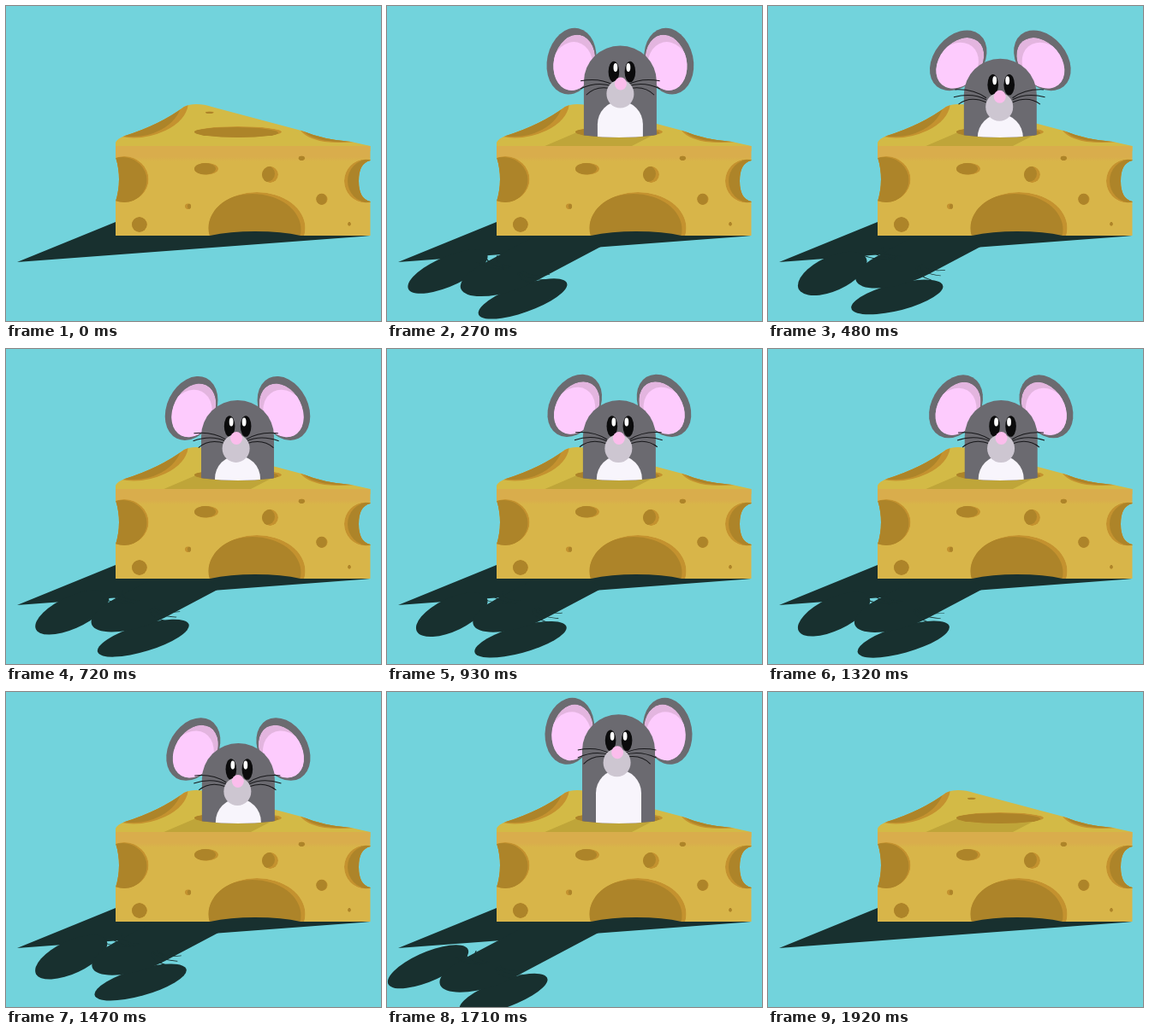
Write an HTML page with a canvas that moves like this. It is 438 by 369 pixels and loops after 1950 ms.

```html
<!DOCTYPE html>
<html lang="en">
<head>
<meta charset="utf-8">
<title>Mouse in the cheese</title>
<style>
html, body { margin: 0; width: 100%; height: 100%; overflow: hidden; background: #72d3dc; }
canvas { display: block; }
</style>
</head>
<body>
<canvas id="stage" width="438" height="369"></canvas>
<script>
const ctx = document.getElementById('stage').getContext('2d');
const { PI, sin, cos, exp, min, max } = Math;
const LOOP = 1950, FRAME = 30;
const DEPTH = 145;               // how far the mouse sinks to be out of sight
const RISE = 30, EXIT = 1480, EXIT_TIME = 430;
const C = {
  sky: '#72d3dc', shade: '#18302f', front: '#d8b549', band: '#d9ad4c', top: '#d3ba46',
  cast: '#bfa539', hole: '#ad8429', lip: '#c4922f', fur: '#6b6a70', earRim: '#6b6b70',
  earDeep: '#e3b5df', ear: '#fdcbfd', muzzle: '#cdc6d1', nose: '#fbbdec', belly: '#f8f5fc'
};

const sinceRise = t => max(0, t - RISE) / 1000;

// pops up like a damped spring
function spring(t) {
  const s = sinceRise(t);
  return DEPTH * exp(-9 * s) * cos(5 * PI * s);
}

// leaves with a wind-up before the drop
function exit(t) {
  const u = min(1, max(0, (t - EXIT) / EXIT_TIME));
  return DEPTH * u * u * (3.9 * u - 2.9);
}

function poseAt(t) {
  const s = sinceRise(t);
  const swing = -46 * exp(-3.5 * s) * sin(4 * PI * (s - 0.08));
  const drag = 1.25 * (exit(t - 30) - exit(t - 120));
  const x = 271.5 - cos(2 * PI * (t - 700) / 1000);
  return { x, face: x - 272.4, drop: spring(t) + exit(t), ear: min(60, 30 + swing + drag) };
}

function ellipsePath(x, y, rx, ry) {
  const p = new Path2D();
  p.ellipse(x, y, rx, ry, 0, 0, PI * 2);
  return p;
}

function oval(x, y, rx, ry, fill) {
  ctx.fillStyle = fill;
  ctx.fill(ellipsePath(x, y, rx, ry));
}

function shape(d, fill) {
  ctx.fillStyle = fill;
  ctx.fill(new Path2D(d));
}

function within(path, draw) {
  ctx.save();
  ctx.clip(path);
  draw();
  ctx.restore();
}

// a hole whose lit rim shows beside its dark inside
function hole(x, y, rx, ry, dx, dy = 0) {
  within(ellipsePath(x, y, rx, ry), () => {
    oval(x, y, rx, ry, C.lip);
    oval(x + dx, y + dy, rx, ry, C.hole);
  });
}

const wedge = new Path2D('M128 164V160Q130 155 139 152Q180 139 208 118Q214 115 222 115Q232 115 240 118' +
  'L345 146Q372 157 403 159L425.5 164V181Q412 184 412 205Q412 226 425.5 229V269H128V229Q136 203 128 177Z');

function drawCheese(cast) {
  within(wedge, () => {
    ctx.fillStyle = C.top;
    ctx.fillRect(120, 110, 310, 60);
    if (cast) shape('M182 165L224 147L313 150L284 165Z', C.cast);
    const face = ctx.createLinearGradient(0, 177, 0, 182);
    face.addColorStop(0, C.band);
    face.addColorStop(1, C.front);
    ctx.fillStyle = face;
    ctx.fillRect(120, 164, 310, 106);

    shape('M134 153Q160 158 186 146Q211 134 213 114L200 118Z', C.lip);
    shape('M136 152Q160 156 181 145Q201 134 206 114L200 118Z', C.hole);
    shape('M343 144Q349 155 372 159Q390 161 408 159Z', C.lip);
    shape('M346 145Q354 155 376 158Q390 160 405 158Z', C.hole);
    hole(238, 124.8, 5, 1.3, -1);
    hole(271, 147.5, 51, 6.5, -4, 1);

    hole(138, 203, 28.5, 27, -2, 1);
    hole(420, 205, 25, 25.5, 4);
    hole(234, 190.7, 14, 7, -3);
    hole(308.5, 197.5, 9.5, 9.7, -4, -1);
    hole(345.5, 178.3, 3.8, 2.8, -0.5);
    hole(369, 226.3, 6.7, 6.7, -1);
    hole(212.5, 234.7, 3.6, 3.4, 3);
    hole(156, 256, 9, 9, -0.5);
    hole(401, 255.2, 1.9, 2.5, 0);
    hole(293, 260, 56.5, 42, -5, 2);
    shape('M236 269.5Q260 264 291 264Q324 264 346 269.5Z', C.shade);
  });
}

function bothSides(draw) {
  for (const side of [-1, 1]) {
    ctx.save();
    ctx.scale(side, 1);
    draw();
    ctx.restore();
  }
}

function drawEar(angle, ink) {
  ctx.translate(20, 26);
  ctx.rotate(-angle * PI / 180);
  // at zero turn the ear stands upright beside its joint
  ctx.translate(37.7, 0);
  oval(0, 0, 28.5, 39.3, ink || C.earRim);
  if (ink) return;
  within(ellipsePath(-3.5, 1, 24, 33), () => {
    oval(-3.5, 1, 24, 33, C.earDeep);
    oval(-2, 10, 25, 33, C.ear);
  });
}

function drawMouse(p, ink) {
  const w = ink ? 38.5 : 42.5;   // the shadow is a little slimmer
  ctx.save();
  ctx.translate(p.x, 60 + p.drop);
  bothSides(() => drawEar(p.ear, ink));
  shape(`M${-w} 150V42A${w} 42 0 0 1 ${w} 42V150Z`, ink || C.fur);
  if (!ink) shape('M-26.5 150V92A26.5 27 0 0 1 26.5 92V150Z', C.belly);

  ctx.translate(p.face, 0);
  ctx.strokeStyle = ink || '#17171a';
  ctx.lineWidth = 1;
  bothSides(() => {
    ctx.translate(13, 0);
    ctx.rotate((30 - p.ear) * 0.3 * PI / 180);
    ctx.stroke(new Path2D('M0 46Q15 36 37 38M0 48Q17 40 38 47M0 51Q19 44 32 55'));
  });
  if (!ink) {
    for (const side of [-1, 1]) {
      const x = 2 + side * 9.5;
      oval(x, 30.5, 6.3, 12.3, '#0b0b0c');
      oval(x - side * 2, 25.5, 2.4, 5, '#fff');
    }
    oval(0, 56.5, 16, 16.5, C.muzzle);
    oval(0.5, 44.5, 7, 7.5, C.nose);
  }
  ctx.restore();
}

const opening = ellipsePath(271, 147.5, 51, 6.5);
opening.rect(0, -50, 438, 197.5);
const aboveFloor = new Path2D('M0 -200H500V163H0Z');

function render(t) {
  const pose = poseAt(t);
  ctx.fillStyle = C.sky;
  ctx.fillRect(0, 0, 438, 369);
  shape('M13 300L128 253L200 262L425 269.3Z', C.shade);

  // the ground shadow is the same mouse, slanted along the floor
  ctx.save();
  ctx.transform(0.77, 0.28, 1.13, -0.6, -168, 289.5);
  within(aboveFloor, () => drawMouse(pose, C.shade));
  ctx.restore();

  drawCheese(t >= RISE);
  within(opening, () => drawMouse(pose));
}

const start = performance.now();
function tick() {
  const t = (performance.now() - start) % LOOP;
  render(Math.floor(t / FRAME) * FRAME);
  requestAnimationFrame(tick);
}
tick();
</script>
</body>
</html>
```
